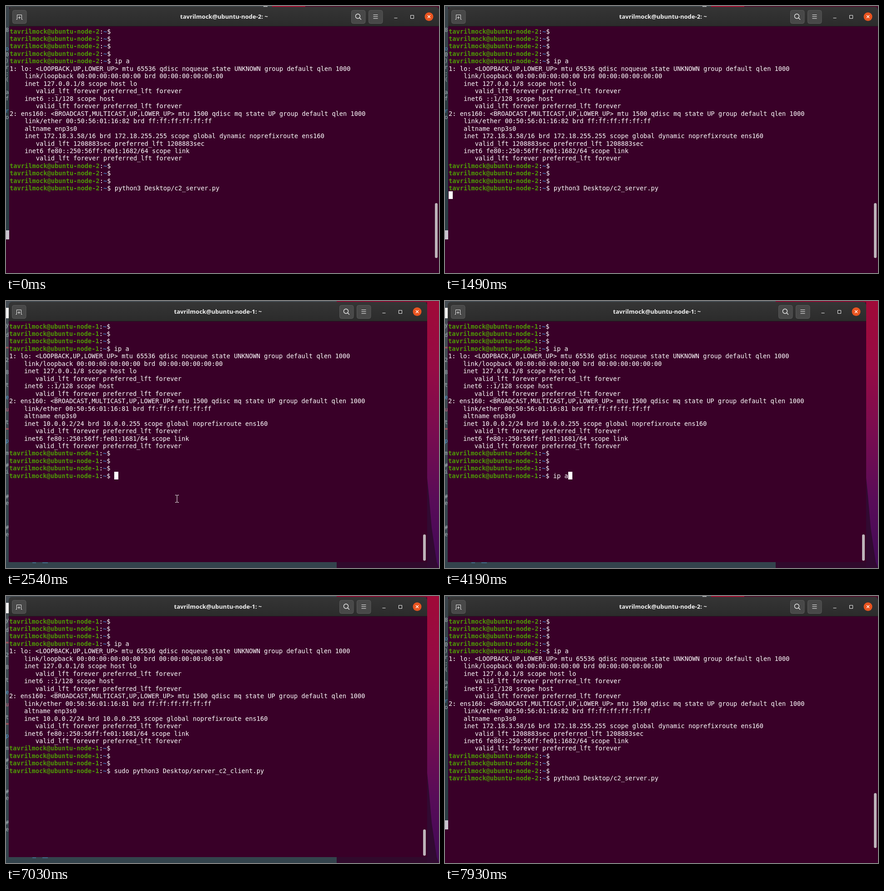
An HTML page with a canvas that plays this animation: 952x588 px, repeating every 8000 ms.

```html
<!DOCTYPE html>
<html lang="en">
<head>
<meta charset="utf-8">
<title>Two terminals</title>
<style>
  html, body { margin: 0; width: 100%; height: 100%; overflow: hidden; background: #390028; }
  canvas { display: block; }
</style>
</head>
<body>
<canvas id="stage" width="952" height="588"></canvas>
<script>
const ctx = document.getElementById('stage').getContext('2d');
const LOOP = 8000, CELL = 8.236, LINE = 16.47, TOP = 46.6;
const MONO = '13.68px "DejaVu Sans Mono", monospace';
const TERMINAL = '#390028', WHITE = '#fff', GREEN = '#4e9a06', BLUE = '#3f74b5';
const USER = 'tavrilmock';

const forever = '       valid_lft forever preferred_lft forever';
const ipOutput = (mac, inet, lease) => [
  '1: lo: <LOOPBACK,UP,LOWER_UP> mtu 65536 qdisc noqueue state UNKNOWN group default qlen 1000',
  '    link/loopback 00:00:00:00:00:00 brd 00:00:00:00:00:00',
  '    inet 127.0.0.1/8 scope host lo', forever,
  '    inet6 ::1/128 scope host', forever,
  '2: ens160: <BROADCAST,MULTICAST,UP,LOWER_UP> mtu 1500 qdisc mq state UP group default qlen 1000',
  `    link/ether 00:50:56:01:16:${mac} brd ff:ff:ff:ff:ff:ff`,
  '    altname enp3s0',
  `    inet ${inet} noprefixroute ens160`, lease,
  `    inet6 fe80::250:56ff:fe01:16${mac}/64 scope link`, forever
];

// Lines starting with "$" carry a prompt.
const server = {
  host: 'ubuntu-node-2', left: 7, right: 952, bottom: 588, textX: 8.1, scroll: [434, 555],
  lines: ['$', '$', '$', '$', '$ip a',
    ...ipOutput('82', '172.18.3.58/16 brd 172.18.255.255 scope global dynamic',
      '       valid_lft 1208883sec preferred_lft 1208883sec'),
    '$', '$', '$', '$python3 Desktop/c2_server.py']
};
const client = {
  host: 'ubuntu-node-1', left: 6, right: 926, bottom: 575, textX: 7.1, scroll: [514, 572],
  lines: ['$', '$', '$', '$ip a',
    ...ipOutput('81', '10.0.0.2/24 brd 10.0.0.255 scope global', forever),
    '$', '$', '$']
};

// [start, x, y, shape]; without a position the pointer is hidden.
const pointerSteps = [
  [0], [440, 607, 270], [590, 484, 122], [740, 486, 130], [1040, 479, 118], [1190],
  [1340, 267, 349, 'arrow'], [1490], [2390, 275, 584], [2540, 372, 427], [4190],
  [6280, 391, 384], [6430, 407, 342], [6580, 431, 183], [6730]
];
const commandSteps = [[0, ''], [4190, 'ip a'], [4790, 'sudo python3 Desktop/server_c2_client.py']];
const serverCaret = [[0, false], [140, true], [740, false], [1340, true], [7180, false], [7330, true], [7930, false]];
const clientCaret = [[0, true], [5830, false], [6430, true], [7030, false]];
const at = (steps, t) => steps.filter(step => step[0] <= t).pop();

function rect(x, y, w, h, fill) {
  ctx.fillStyle = fill;
  ctx.fillRect(x, y, w, h);
}
function rounded(x, y, w, h, r, fill, stroke) {
  ctx.beginPath();
  ctx.roundRect(x, y, w, h, r);
  ctx.fillStyle = fill;
  ctx.fill();
  if (stroke) { ctx.strokeStyle = stroke; ctx.lineWidth = 1; ctx.stroke(); }
}
function polygon(points, fill) {
  ctx.beginPath();
  points.forEach(([x, y]) => ctx.lineTo(x, y));
  ctx.closePath();
  ctx.fillStyle = fill;
  ctx.fill();
}
function path(d, x, y, color, width = 1) {
  ctx.save();
  ctx.translate(x, y);
  ctx.strokeStyle = color;
  ctx.lineWidth = width;
  ctx.stroke(new Path2D(d));
  ctx.restore();
}
function gradient(y0, y1, ...colors) {
  const g = ctx.createLinearGradient(0, y0, 0, y1);
  colors.forEach((c, i) => g.addColorStop(i / (colors.length - 1), c));
  return g;
}

function type(win, text, col, row, color = WHITE, bold = false) {
  const baseline = Math.round(TOP + 13.9 + row * LINE);
  ctx.font = (bold ? 'bold ' : '') + MONO;
  ctx.fillStyle = color;
  [...text].forEach((ch, i) => {
    if (ch !== ' ') ctx.fillText(ch, win.textX + (col + i) * CELL, baseline);
  });
}
function typeLine(win, line, row) {
  if (line[0] !== '$') return type(win, line, 0, row);
  const name = USER + '@' + win.host;
  type(win, name, 0, row, GREEN, true);
  type(win, ':', name.length, row);
  type(win, '~', name.length + 1, row, BLUE, true);
  type(win, '$ ' + line.slice(1), name.length + 2, row);
}
function caret(win, col, row) {
  rect(Math.round(win.textX + col * CELL), Math.floor(TOP + row * LINE), 9, 17, '#fff');
}

function edgeText(letters) {
  ctx.font = '12px "DejaVu Sans Mono", monospace';
  for (const [ch, y, color = '#a5afb5'] of letters) {
    ctx.fillStyle = color;
    ctx.fillText(ch, -1, y + 4);
  }
}
function serverBackdrop() {
  rect(0, 0, 952, 588, TERMINAL);
  rect(0, 0, 7, 494, gradient(0, 494, '#3a444b', '#293940', '#2b3c44'));
  rect(0, 494, 7, 20, '#c9c3ce');
  rect(0, 0, 585, 3, '#3d4549');
  rect(566, 0, 9, 2, '#a9adaf');
  rect(585, 0, 73, 3, '#a80f33');
  rect(658, 0, 294, 3, '#51102c');
  edgeText([['8', 53], ['o', 94, '#4d8dbd'], ['0', 107], [')', 121], ['r', 135], [':', 149],
    ['(', 162], ['a', 190], ['f', 204], ['r', 231, '#4d8dbd'], ['o', 245]]);
}
function clientBackdrop() {
  rect(0, 0, 952, 588, gradient(0, 588, '#444c53', '#39464e', '#33434c'));
  rect(0, 15, 6, 23, '#f0f0f0');
  rect(727, 0, 225, 588, '#300a2c');
  rect(727, 0, 225, 3, '#8d0b32');
  rect(926, 0, 26, 588, gradient(0, 588, '#a00a38', '#960b45', '#780c50', '#580c58', '#420957'));
  polygon([[926, 390], [930, 430], [936, 500], [947, 575], [952, 588], [926, 588]], '#310a31');
  rect(58, 576, 8, 1, '#4d8dbd');
  rect(80, 576, 12, 1, '#4d8dbd');
  edgeText([['y', 53], ['d', 75], ['=', 102, '#d45a62'], ['2', 130], ['8', 157], ['t', 185],
    ['e', 212, '#549bcd'], ['u', 239, '#c9657f'], ['t', 267], ['=', 281, '#d45a62'],
    ['p', 308, '#549bcd'], ['m', 335], ['#', 362], ['i', 376], ['#', 431], ['e', 445],
    ['#', 499], ['e', 514]]);
}

function drawWindow(win) {
  const { left, right, bottom } = win;
  rect(left, 45, right - left, bottom - 45, TERMINAL);
  rounded(left, 2, right - left, 43, [7, 7, 0, 0], gradient(2, 45, '#353535', '#2b2b2b'));
  rect(left, 44, right - left, 1, '#1f1a1d');
  for (const x of [left + 7, right - 193, right - 155])
    rounded(x + .5, 9.5, 30.5, 29, 4, '#484848', '#5a5a5a');

  path('M-7 5H-5V-5H5V5H7M-3 1H3M0 -2V4', left + 22.5, 24.5, '#e8e8e8');
  path('M4 -1A5 5 0 1 1 -6 -1A5 5 0 1 1 4 -1M2.5 2.5L6.5 6.5', right - 177.5, 23.5, '#f0f0f0', 1.3);
  path('M-5 -4H5M-5 0H5M-5 4H5', right - 139.5, 23.5, '#f0f0f0');
  path('M-3.5 3H3.5', right - 95, 23.5, '#f0f0f0');
  path('M-3 -3H4V4H-3Z', right - 59.5, 23.5, '#f0f0f0');
  rounded(right - 31.5, 14, 19, 19, 9.5, '#e95420');
  path('M-3 -3L3 3M3 -3L-3 3', right - 22, 23.5, '#fff', 1.3);

  ctx.font = 'bold 13px "Noto Sans", sans-serif';
  ctx.fillStyle = '#f4f4f4';
  ctx.textAlign = 'center';
  ctx.fillText(`${USER}@${win.host}: ~`, (left + right) / 2, 28);
  ctx.textAlign = 'left';

  const [top, end] = win.scroll;
  rounded(right - 9, top, 6, end - top, 3, '#bdb4ba');
  win.lines.forEach((line, row) => typeLine(win, line, row));
}

function drawPointer([, x, y, shape]) {
  if (x === undefined) return;
  if (shape === 'arrow') {
    polygon([[x, y], [x, y + 17], [x + 4, y + 13], [x + 7, y + 19], [x + 9, y + 18],
      [x + 7, y + 12], [x + 12, y + 12]], '#fff');
  } else {
    path('M0 .5H3L4 1.5L5 .5H8M4 1V16M0 16.5H3L4 15.5L5 16.5H8', x, y, '#fff');
  }
}

function draw(t) {
  if (t < 1940 || t >= 7180) {
    serverBackdrop();
    drawWindow(server);
    if (at(serverCaret, t)[1]) caret(server, 0, 22);
  } else {
    clientBackdrop();
    drawWindow(client);
    const command = at(commandSteps, t)[1];
    typeLine(client, '$' + command, 20);
    if (at(clientCaret, t)[1]) {
      // The completed command ends with a space.
      if (t < 5390) caret(client, 28 + command.length + (command.length > 4 ? 1 : 0), 20);
      else caret(client, 0, 21);
    }
  }
  drawPointer(at(pointerSteps, t));
}

const start = performance.now();
function tick() {
  draw((performance.now() - start) % LOOP);
  requestAnimationFrame(tick);
}
tick();
</script>
</body>
</html>
```
